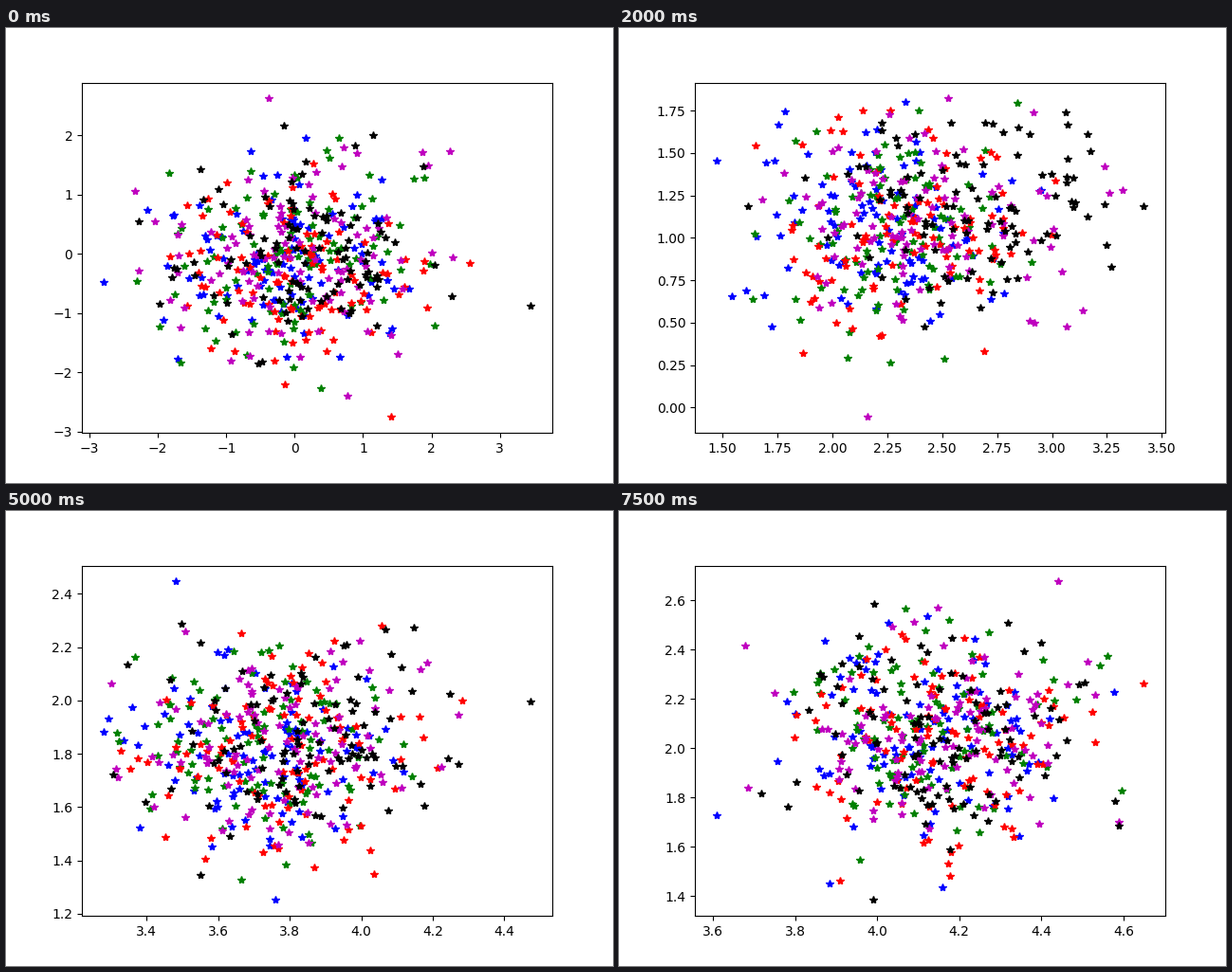
These frames come from a looping animation (640x480 px, 8 s). A matplotlib script:

```python
import numpy as np
import matplotlib.pyplot as plt
from matplotlib.animation import FuncAnimation

STEPS, CHAINS, COLORS = 16, 100, "bgrmk"
LIMIT = np.array([4.37, 2.20])    # where the chains settle
RATE = np.array([0.82, 0.838])    # part of the gap left after each step
LAG = np.outer([-1.0, -0.5, -0.2, 0.2, 1.1], [1.0, 0.3])
MEMORY = 0.8

# Axis windows at key steps: (x low, y low), (x high, y high)
KEY_VIEWS = {
    0: ((-3.112, -3.022), (3.767, 2.889)),
    3: ((0.794, -0.421), (3.231, 1.785)),
    6: ((2.208, 0.261), (3.971, 2.131)),
    8: ((2.767, 0.887), (4.245, 2.373)),
    10: ((3.219, 1.192), (4.534, 2.506)),
    12: ((3.387, 1.289), (4.608, 2.588)),
    15: ((3.556, 1.320), (4.702, 2.741)),
}


def mean(k):
    return LIMIT * (1 - RATE**k)


def window(k):
    """Low and high corners; reach from the mean shrinks as a power of time."""
    keys = np.array(list(KEY_VIEWS))
    reach = np.log([np.abs(np.array(KEY_VIEWS[j]) - mean(j)) for j in keys])
    logs = [np.interp(np.log1p(k), np.log1p(keys), r) for r in reach.reshape(-1, 4).T]
    down, up = np.exp(logs).reshape(2, 2)
    return mean(k) - down, mean(k) + up


def noise_paths():
    """Correlated unit noise, shaped (step, colour, chain, axis)."""
    rng = np.random.default_rng(7)
    z = rng.standard_normal((STEPS, len(COLORS), CHAINS, 2))
    for k in range(1, STEPS):
        z[k] = MEMORY * z[k - 1] + np.sqrt(1 - MEMORY**2) * z[k]
    return z


def cloud(k, low, high):
    span = high - low
    lag = 0.18 * k * np.exp(-k / 3) * LAG
    pts = mean(k) + lag[:, None] + span / 6.8 * noise[k]

    # Keep a 5 % margin, with the outermost points touching it
    low, high = low + span / 22, high - span / 22
    pts = low + np.abs(pts - low)
    pts = high - np.abs(high - pts)
    flat = pts.reshape(-1, 2)
    for axis in range(2):
        flat[flat[:, axis].argmin(), axis] = low[axis]
        flat[flat[:, axis].argmax(), axis] = high[axis]
    return flat.reshape(pts.shape)


def update(k):
    low, high = window(k)
    for line, pts in zip(lines, cloud(k, low, high)):
        line.set_data(*pts.T)
    ax.set_xlim(low[0], high[0])
    ax.set_ylim(low[1], high[1])
    return lines


noise = noise_paths()
fig, ax = plt.subplots(figsize=(6.4, 4.8), dpi=100)
lines = [ax.plot([], [], c + "*")[0] for c in COLORS]
anim = FuncAnimation(fig, update, frames=STEPS, interval=500, repeat=True)
plt.show()
```
